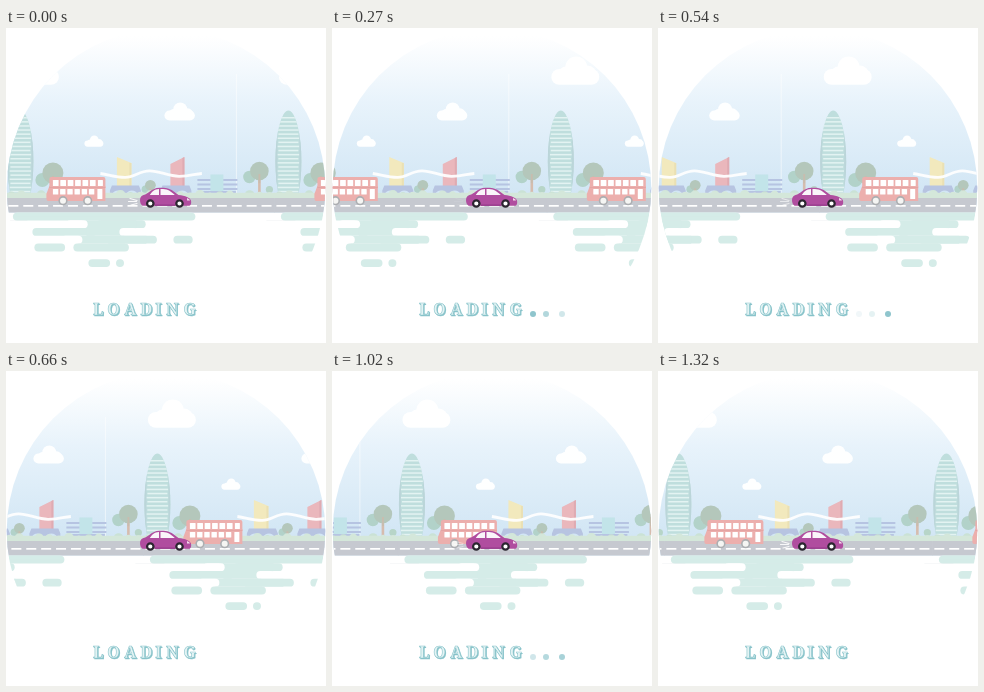
These frames come from a looping animation (320x315 px, 1.35 s). An HTML page:

```html
<!DOCTYPE html>
<html lang="en">
<head>
<meta charset="utf-8">
<title>Loading</title>
<style>
html, body { margin: 0; width: 100%; height: 100%; overflow: hidden; background: #fff; }
svg { display: block; width: 320px; height: 315px; }
text { font: 900 16px "Noto Serif", serif; text-anchor: middle; }
</style>
</head>
<body>
<svg viewBox="0 0 320 315">
  <defs>
    <linearGradient id="sky" gradientUnits="userSpaceOnUse" x1="0" y1="8" x2="0" y2="172">
      <stop offset="0" stop-color="#fff"/>
      <stop offset=".4" stop-color="#e8f3fb"/>
      <stop offset="1" stop-color="#d0e5f4"/>
    </linearGradient>
    <clipPath id="disc"><circle cx="160" cy="160" r="159.3"/></clipPath>
    <clipPath id="hull"><ellipse cx="282" cy="133.500" rx="13" ry="51"/></clipPath>
    <g id="tile"></g>
  </defs>
  <g clip-path="url(#disc)">
    <rect width="320" height="184.500" fill="url(#sky)"/>
    <g id="world">
      <path d="M230 46v120" stroke="#fff" stroke-opacity=".55"/>
      <use href="#tile" x="-268"/><use href="#tile"/><use href="#tile" x="268"/><use href="#tile" x="536"/>
    </g>
  </g>
  <g id="puff" stroke="#fff" stroke-width="1.200" stroke-linecap="round" fill="none">
    <path d="M124 170.500l7 2M122.500 173.500h8M125 177l6-1.500"/>
  </g>
  <g id="car">
    <path d="M134.200 174c-.4-3.500.3-6 3.300-7 5-1 7.500-7 16-7.300h4c6.500.2 10.500 3.600 15 7.300 7 .6 11.500 2.600 12.500 5.500.5 2.500.2 4.500-1.500 5.300H136.500q-2-.8-2.300-3.800z" fill="#b04d9f"/>
    <path d="M149 177.800v-1.300h20v1.300z" fill="#94398a"/>
    <path d="M143.800 167c2.500-3.900 4.500-5.700 9.200-6v6zM154.500 161h2.500c5 .2 8.300 2.600 11.800 6h-14.300z" fill="#faf5fa"/>
    <path d="M181 170q3 1 3 2.500h-3z" fill="#f3d9ec"/>
    <g fill="#fff" stroke="#2b2630" stroke-width="2.200">
      <circle cx="144.300" cy="175.500" r="3.200"/><circle cx="173.500" cy="175.500" r="3.200"/>
    </g>
  </g>
  <g id="label">
    <text x="93.300 108.600 125.300 141.400 153.500 167.400 184.700" y="288.300" fill="#86c2c9" stroke="#86c2c9" stroke-width=".3">LOADING</text>
    <text x="92.300 107.600 124.300 140.400 152.500 166.400 183.700" y="287" fill="#e3f3f4" stroke="#86c2c9" stroke-width=".6">LOADING</text>
  </g>
  <g id="dots" fill="#8fc5cd">
    <circle cx="201" cy="286" r="3"/><circle cx="214" cy="286" r="3"/><circle cx="230" cy="286" r="3"/>
  </g>
</svg>
<script>
const LOOP = 1350, STEP = 30, SPAN = 268, WAVE = 590;
const $ = id => document.getElementById(id);

const rect = (x, y, w, h, fill, r = 0) =>
  `<rect x="${x}" y="${y}" width="${w}" height="${h}" rx="${r}" fill="${fill}"/>`;
const disc = (x, y, r, fill) => `<circle cx="${x}" cy="${y}" r="${r}" fill="${fill}"/>`;
const path = (d, fill) => `<path d="${d}" fill="${fill}"/>`;
const times = (n, f) => Array.from({ length: n }, (_, i) => f(i)).join('');

const cloud = (x, y, w) => `<g transform="translate(${x} ${y}) scale(${w})" opacity=".96">` +
  rect(0, .26, 1, .33, '#fff', .165) + disc(.52, .23, .23, '#fff') +
  disc(.76, .37, .18, '#fff') + disc(.3, .35, .14, '#fff') + '</g>';

const tree = (x, y, r, dx, dy, r2) =>
  disc(x + dx, y + dy, r2, '#b2d2c9') + rect(x - 1.3, y, 2.6, 165 - y, '#d6bcae') +
  disc(x, y, r, '#b4c7bb') +
  path(`M${x - .9} ${y + r + 3}V${y + 3}h1.8v${r}z`, '#c8bcae');

function tower() {
  return '<g clip-path="url(#hull)">' + rect(267, 82, 30, 85, '#bfdedd') +
    times(19, i => rect(272 - (i % 2), 89 + i * 4.1, 20 + 2 * (i % 2), 1.5, '#e3f3f2')) +
    rect(267, 82, 4, 85, '#bbd5d9') + rect(293, 82, 4, 85, '#bbd5d9') + '</g>';
}

function bridge() {
  const pier = x => path(`M${x + 2} 157.500h27l2 5v4h-3q-2-4-6-4t-6 4h-2q-2-4-6-4t-6 4h-2v-4z`, '#b7c4e1');
  return path('M110.500 129l14.500 6v23h-14.500z', '#f2e9bd') + rect(123, 135, 2, 23, '#eae0b4') +
    path('M164 136l14-7v29h-14z', '#eab7bc') + path('M176 130l2-1v29h-2z', '#dfabb2') +
    pier(103.5) + pier(154) +
    '<path d="M94 145.500C104 147 110 149.500 119 149.300S133 143 143 142.800 162 148.500 173 148.300 188 146 195.500 145.500" fill="none" stroke="#fff" stroke-width="2.800" opacity=".92"/>';
}

const offices = () =>
  times(3, i => rect(191, 151 + i * 4.5, 40, 2, '#b6c4e2')) +
  rect(204, 146.5, 13, 19, '#c2e4e9') + rect(192.5, 163, 37, 2, '#b6c4e2');

const hedge = () => times(27, i =>
  disc(i * SPAN / 27 + 5, 167, 3.6 + 1.4 * Math.sin(i * 2.4), i % 3 ? '#d3e7da' : '#cae2d5')) +
  rect(0, 164.8, SPAN + .5, 5.5, '#d4e7da');

const road = () => rect(0, 170, SPAN + .5, 14.5, '#c6c9d0') +
  times(18, i => rect(i * SPAN / 18 + 2, 177, 10, 1.7, '#fff'));

function bus() {
  const wheel = x => disc(x, 172.7, 4.6, '#acaeb1') + disc(x, 172.7, 3, '#f5f5f3');
  return rect(43, 149, 56, 12, '#ecafad', 2) +
    path('M43 158h56v15H42q-2 0-2-2v-5z', '#ecafad') + rect(43, 159, 56, 1, '#e5a4a3') +
    times(6, i => rect(46.5 + i * 7.4, 152, 5.7, 6, '#fff', .5)) +
    times(6, i => rect(46.5 + i * 7.2, 161, 5.4, 5.6, '#fff', .5)) +
    rect(91.5, 152, 5, 6, '#fff', .5) + rect(91, 161, 5, 10, '#fff', .5) +
    wheel(56.6) + wheel(81.3);
}

function water() {
  const c = '#d5ece8';
  const bar = (x1, x2, y) => rect(x1, y, x2 - x1, 7.8, c, 3.9);
  const join = (x1, x2, y) => rect(x1, y, x2 - x1, 7.8, c);
  const notch = (x1, x2, y) => rect(x1, y, x2 - x1, 7.8, '#fff', 3.9);
  return bar(6.5, 189, 184.7) + rect(10, 184.5, 175, 4, c) +
    bar(90, 139.3, 192.3) + join(76, 130, 192.3) + notch(60, 81.3, 192.3) +
    bar(26, 90, 200) + join(80, 118, 200) + notch(113, 130, 200) +
    bar(100, 150.5, 207.8) + join(72, 140, 207.8) + notch(55, 76, 207.8) + bar(167, 186.3, 207.8) +
    bar(28, 58.7, 215.6) + bar(67, 122.5, 215.6) +
    bar(82, 103.7, 231.2) + bar(109.6, 117.6, 231.2) +
    rect(260, 192, 29, .5, '#eef1f2');
}

$('tile').innerHTML =
  cloud(158, 74.5, 30.5) + cloud(78, 107.5, 19) + cloud(272.5, 28.5, 48) +
  tree(46.5, 145, 10.5, -10.5, 7, 7) + tower() +
  tree(253, 143, 9.3, -10, 6, 6.2) + disc(263, 161.5, 3.6, '#b7d5c8') +
  bridge() + tree(144, 157.3, 5.4, -5, 4, 3.8) + offices() +
  hedge() + road() + bus() + water();

// Opacity of each dot as [ms, value] points within one wave
const waves = [
  [[145, 0], [175, 1], [280, 1], [420, .45], [540, .13], [590, 0]],
  [[145, 0], [175, .6], [280, .7], [420, .7], [540, .23], [590, 0]],
  [[145, 0], [175, .32], [280, .42], [420, .75], [540, 1], [575, 1], [590, 0]]
];

function mix(points, t) {
  if (t <= points[0][0]) return points[0][1];
  for (let i = 1; i < points.length; i++) {
    const [a, u] = points[i - 1], [b, v] = points[i];
    if (t <= b) return u + (v - u) * (t - a) / (b - a);
  }
  return 0;
}

const dots = [...$('dots').children];

function draw(now) {
  const t = Math.floor((now % LOOP) / STEP) * STEP;
  $('world').setAttribute('transform', `translate(${.4 - SPAN * t / LOOP} 0)`);
  dots.forEach((dot, i) => dot.setAttribute('opacity', mix(waves[i], t % WAVE)));
  $('puff').setAttribute('opacity', .45 + .45 * Math.cos(t / LOOP * 6 * Math.PI));
}

const start = performance.now();
function tick() {
  draw(performance.now() - start);
  requestAnimationFrame(tick);
}
tick();
</script>
</body>
</html>
```
